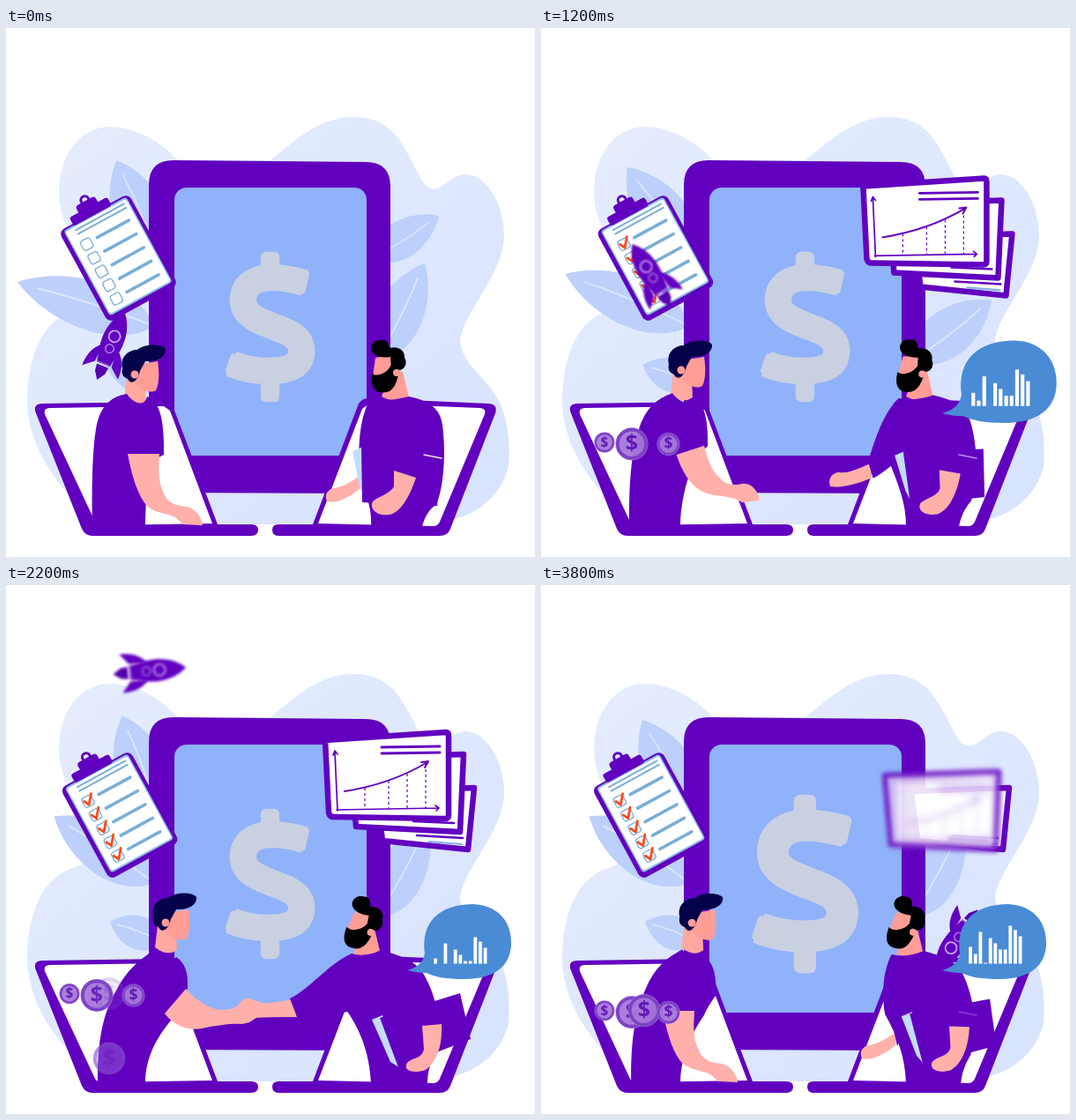
An HTML page with a canvas for the animation above (4 s loop, 600 px wide and 600 px high).

```html
<!DOCTYPE html>
<html lang="en">
<head>
<meta charset="utf-8">
<title>Business deal</title>
<style>
html, body { margin: 0; width: 100%; height: 100%; overflow: hidden; background: #fff; }
canvas { display: block; width: 600px; height: 600px; }
</style>
</head>
<body>
<canvas id="stage" width="600" height="600"></canvas>
<script>
const ctx = document.getElementById('stage').getContext('2d');
const LOOP = 4000, STEP = 200;
const PURPLE = '#6200c0', SKIN = '#ffb0aa', FACE = '#ff9d97', LEAF = '#bcd0fb', BLUE = '#7aaed6';

const clamp = (v, a = 0, b = 1) => Math.max(a, Math.min(b, v));
const ramp = (t, from, to) => clamp((t - from) / (to - from));
const smooth = k => k * k * (3 - 2 * k);
const wave = (t, period, peak = 0) => Math.cos((t - peak) / period * 2 * Math.PI);
const popOut = k => 1 + 2.7 * (k - 1) ** 3 + 1.7 * (k - 1) ** 2;

// Blend two paths that share the same commands
function blend(a, b, k) {
  const n = b.match(/-?[\d.]+/g);
  let i = 0;
  return a.replace(/-?[\d.]+/g, v => (+v + (n[i++] - v) * k).toFixed(2));
}

// Point on a Catmull-Rom curve through evenly timed points
function along(points, u) {
  const i = Math.floor(u), f = u - i;
  const at = j => points[clamp(j, 0, points.length - 1)];
  const [a, b, c, d] = [at(i - 1), at(i), at(i + 1), at(i + 2)];
  return [0, 1].map(n => b[n] + .5 * f * (c[n] - a[n]
    + f * (2 * a[n] - 5 * b[n] + 4 * c[n] - d[n] + f * (3 * (b[n] - c[n]) + d[n] - a[n]))));
}

function fill(d, color) {
  ctx.fillStyle = color;
  ctx.fill(new Path2D(d));
}

function line(d, color, width, cap = 'round') {
  ctx.strokeStyle = color;
  ctx.lineWidth = width;
  ctx.lineCap = cap;
  ctx.lineJoin = 'round';
  ctx.stroke(new Path2D(d));
}

function box(x, y, w, h, r, color) {
  ctx.beginPath();
  ctx.roundRect(x, y, w, h, r);
  ctx.fillStyle = color;
  ctx.fill();
}

function disc(x, y, r, color) {
  ctx.beginPath();
  ctx.arc(x, y, r, 0, 7);
  ctx.fillStyle = color;
  ctx.fill();
}

function ring(x, y, r, color, width) {
  ctx.beginPath();
  ctx.arc(x, y, r, 0, 7);
  ctx.strokeStyle = color;
  ctx.lineWidth = width;
  ctx.stroke();
}

// Draw with a transform around the pivot (px, py)
function layer(draw, { x = 0, y = 0, px = 0, py = 0, turn = 0, scale = 1, alpha = 1, blur = 0 } = {}) {
  ctx.save();
  ctx.translate(x + px, y + py);
  ctx.rotate(turn * Math.PI / 180);
  ctx.scale(scale, scale);
  ctx.translate(-px, -py);
  ctx.globalAlpha *= alpha;
  if (blur) ctx.filter = `blur(${blur}px)`;
  draw();
  ctx.restore();
}

function blob() {
  const g = ctx.createLinearGradient(100, 100, 480, 560);
  g.addColorStop(0, '#e4ecfd');
  g.addColorStop(1, '#d8e3fe');
  fill(`M117 112 C146 112 175 128 195 150 L300 150 C330 126 355 101 395 101
    C440 101 452 136 468 166 C475 180 482 186 494 180 C506 171 511 166 523 166
    C548 168 566 205 565 238 C562 282 517 325 515 355 C518 384 548 398 560 425
    C570 447 572 475 570 497 C562 530 536 551 505 558 L480 563 L110 563
    C70 535 26 485 24 425 C24 375 40 332 76 321 C100 314 104 296 96 277
    C86 254 60 225 60 185 C61 145 82 113 117 112 Z`, g);
}

function leaf(bx, by, tx, ty, w) {
  const dx = tx - bx, dy = ty - by, len = Math.hypot(dx, dy);
  const nx = -dy / len * w, ny = dx / len * w;
  const at = (k, s) => `${bx + dx * k + nx * s} ${by + dy * k + ny * s}`;
  fill(`M${at(0, 0)} C${at(.2, .9)} ${at(.7, .8)} ${at(1, 0)} C${at(.7, -.8)} ${at(.2, -.9)} ${at(0, 0)} Z`, LEAF);
  line(`M${at(0, 0)} Q${at(.5, .1)} ${at(.85, 0)}`, 'rgba(230,238,255,.75)', 1.8);
}

function leaves(t) {
  const top = wave(t, 2000, 300), side = wave(t, 1500), right = wave(t, 2000);
  leaf(172, 262, 115 + 18 * top, 153 - 5 * top, 46);
  leaf(168, 338, 34 - 21 * side, 275 + 13 * side, 44);
  leaf(178, 405, 116 - 2 * side, 382, 30);
  leaf(415, 262, 499 - 8 * right, 222 - 9 * right, 33);
  leaf(420, 378, 495 - 20 * right, 290 - 23 * right, 42);
}

function phone() {
  fill(`M190 150 L408 152 Q436 152 436 180 L436 500 Q436 528 408 528 L190 527
    Q162 527 162 499 L162 178 Q162 150 190 150 Z`, PURPLE);
  box(191, 181, 218, 304, [14, 14, 0, 0], '#90b2fa');
}

function dollar(t) {
  const beat = smooth(ramp(t % 1000, 400, 750));
  layer(() => {
    const c = '#c9d0e1';
    box(-11, -84, 21, 34, 6, c);
    box(-11, 52, 21, 33, 6, c);
    line(`M38 -49 C24 -53 12 -55 0 -55 C-22 -54 -31 -43 -31 -29 C-30 -12 -14 -7 3 0
      C20 6 35 12 35 28 C34 46 18 50 -2 50 C-18 50 -30 48 -44 42`, c, 30, 'butt');
    line('M39 -59 L35 -41 M-46 50 L-41 35', c, 9);
  }, { x: 300, y: 338.5, scale: 1.01 + .19 * beat });
}

function laptops() {
  fill('M40 426 L180 424 Q187 424 190 431 L240 563 L278 563 Q286 563 286 569 Q286 576 278 576 L98 576 Q90 576 86 568 L34 437 Q30 427 40 426 Z', PURPLE);
  fill('M49 431 L179 429 L186 434 L234 562 L110 564 Q103 564 101 560 L44 438 Q42 432 49 431 Z', '#fff');
  fill('M410 420 L548 426 Q558 427 555 437 L504 568 Q501 576 492 576 L309 576 Q302 576 302 569 Q302 563 309 563 L348 563 L400 426 Q404 420 410 420 Z', PURPLE);
  fill('M412 426 L538 431 Q545 432 543 438 L492 560 Q490 565 484 565 L354 562 L404 432 Z', '#fff');
}

function clipboard(t) {
  const ticks = Math.min(5, Math.ceil(t / 160));
  layer(() => {
    box(-45, -59, 90, 118, 7, PURPLE);
    box(-40, -57, 81, 110, 4, '#8fc0e4');
    box(-38.5, -55, 78, 106, 3, '#fff');
    box(-27, -67, 49, 11, 3, PURPLE);
    box(-15, -75, 25, 11, 4, PURPLE);
    ring(-2, -76, 4.5, PURPLE, 3);
    line('M-27 -51 H35 M-27 -46 H35', BLUE, 2);
    for (let i = 0; i < 5; i++) {
      const y = -32 + i * 17.6;
      line(`M-10 ${y} H31`, BLUE, 3.6);
      ctx.beginPath();
      ctx.roundRect(-30, y - 5, 12, 12, 3);
      ctx.strokeStyle = BLUE;
      ctx.lineWidth = 1.3;
      ctx.stroke();
      if (i < ticks) line(`M-28 ${y - 1} L-25 ${y + 5} L-17 ${y - 5}`, '#ff4a1c', 2.8);
    }
  }, { x: 127.5 - 2.5 * wave(t, 5600, 4200), y: 261, turn: -28.6 });
}

function card(d) {
  fill(d, '#fff');
  line(d, PURPLE, 6.5);
}

function charts(t) {
  const out = ramp(t, 3600, 4000);
  const drift = wave(t, 1600, 1400) * 2 - 2;
  const pose = i => {
    const k = ramp(t, 600 + i * 100, 830 + i * 100);
    return { x: drift, y: drift + 10 * (1 - k), alpha: k, blur: 6 * (1 - k) };
  };
  layer(() => {
    card('M424 238 L535 234 L528 304 L431 294 Z');
    line('M470 288 L522 291', PURPLE, 2.5);
    line('M484 295 L521 298', '#80aef0', 2.2);
  }, pose(2));
  const mid = pose(1), front = pose(0);
  layer(() => {
    card('M394 200 L523 196 L519 284 L401 278 Z');
    line('M466 272 L512 274', PURPLE, 2.5);
  }, { ...mid, y: mid.y + 40 * out, alpha: mid.alpha * (1 - .4 * out), blur: mid.blur + 4 * out });
  layer(() => {
    card('M366 180 L503 171 Q506 171 506 175 L506 265 Q506 269 502 269 L375 267 Q371 267 370 262 Z');
    line('M430 188 L496 187 M430 195 L496 194', PURPLE, 2.8);
    line('M380 260 L377 193 M375 197 L377 192 L380 196 M379 259 L494 257 M491 254 L495 257 L492 260', PURPLE, 1.7);
    line('M388 238 Q440 230 482 205 M475 205 L483 204 L479 211', PURPLE, 2);
    ctx.setLineDash([3, 3]);
    line('M411 234 V258 M438 226 V258 M459 218 V258 M480 207 V257', PURPLE, 1.2, 'butt');
  }, {
    px: 434, py: 219, x: front.x + 50 * out, y: front.y + 78 * out, scale: 1 - .28 * out,
    alpha: front.alpha * (1 - 1.1 * out), blur: front.blur + 8 * out
  });
}

const FLIGHT = [[119, 360], [121, 355], [128, 336], [125, 280], [58, 205], [108, 115],
  [240, 104], [462, 208], [488, 330], [478, 388], [466, 410]];

function rocket(t) {
  const u = t / LOOP * (FLIGHT.length - 1);
  const [x, y] = along(FLIGHT, u), [x2, y2] = along(FLIGHT, u + .05);
  const dx = x2 - x, dy = y2 - y;
  layer(() => {
    fill('M-9 2 C-20 10 -22 22 -22 33 L-10 23 Z M9 2 C20 10 22 22 22 33 L10 23 Z', PURPLE);
    fill('M0 -41 C10 -30 14 -15 12 2 L8 23 H-8 L-12 2 C-14 -15 -10 -30 0 -41 Z', PURPLE);
    fill('M-7 25 H7 L6 33 L0 42 L-6 33 Z', '#5600ae');
    ring(0, -11, 6.5, '#c6a5ee', 1.8);
    ring(0, 4, 4.8, '#a679de', 1.6);
    line('M-8 22 H8', '#a679de', 1);
  }, { x, y, turn: Math.atan2(dx, -dy) * 180 / Math.PI, blur: clamp(Math.hypot(dx, dy) / 3, 0, 1.8) });
}

function leftMan(p, q, open, lift) {
  const head = { x: 35 * p, y: -10 * clamp(p * 1.35) };
  layer(() => fill('M137 396 L158 404 L159 424 Q148 432 134 421 Z', '#ffa8a0'), head);
  fill(blend(
    `M98 565 C97 520 98 480 102 455 C106 430 118 418 137 415 C147 429 158 428 160 418
     C172 422 180 438 179 484 C174 487 168 489 163 492 C160 515 158 545 158 565 Z`,
    `M104 565 C103 520 110 485 125 460 C138 435 152 425 169 413 C181 425 190 425 193 422
     C203 428 207 440 206 458 C200 468 196 477 193 487 C172 510 158 535 158 565 Z`, p), PURPLE);
  fill(blend(
    `M138 483 C142 505 148 525 156 537 C165 551 180 549 192 555 L201 563 L223 564
     C222 555 215 545 205 543 C195 542 185 540 180 530 C172 515 173 500 174 483 Z`,
    `M180 486 C190 499 205 506 222 503 C240 499 258 497 268 498 L276 496 L290 487
     C288 472 275 463 266 473 C262 480 255 481 247 482 C230 482 215 470 204 458 Z`, q), SKIN);
  if (open) layer(() => line('M252 477 L276 468 L290 466 M264 478 L284 470 L299 464 M272 482 L294 472', SKIN, 5), { y: lift });
  layer(() => {
    fill('M147 382 L172 378 C174 390 174 403 170 411 C163 415 154 411 146 402 Z', FACE);
    fill(`M132 386 C129 373 139 365 149 365 C158 358 176 358 181 364 C182 373 171 379 158 378
      L152 389 C149 402 141 405 138 398 C132 396 131 391 132 386 Z`, '#04034a');
    disc(146, 393, 4.5, FACE);
  }, head);
}

function rightMan(p, q) {
  const head = { x: -30 * p, px: 432, py: 395, turn: 15 * clamp(p * 1.3) };
  layer(() => fill('M437 386 L450 390 L457 419 Q440 426 426 418 Z', FACE), { x: -32 * p });
  fill(blend(
    'M402 508 C390 515 380 522 370 522 C364 525 361 530 364 537 C375 540 390 532 402 522 Z',
    'M326 470 C312 472 300 475 290 474 C275 465 262 480 268 492 C290 490 310 490 330 490 Z', q), SKIN);
  fill(blend(
    `M414 565 C416 545 405 520 401 500 C399 470 402 440 413 421 C425 424 440 422 457 418
     C475 422 492 428 495 450 C499 480 497 520 488 541 C480 545 475 555 472 565 Z`,
    `M414 565 C412 530 402 505 386 482 C380 455 385 430 392 418 C400 421 415 420 425 414
     C445 420 465 425 474 442 C490 470 494 500 487 530 C480 545 478 555 478 565 Z`, p), PURPLE);
  fill(blend(
    'M412 423 C404 440 402 460 400 505 L404 523 C410 512 412 500 420 485 Z',
    'M392 418 C365 430 345 458 322 469 L330 490 C355 490 375 486 400 482 Z', q), PURPLE);
  fill(blend('M393 480 L405 475 L408 538 L400 515 Z', 'M415 493 L427 488 L446 547 L436 541 Z', p), '#c3dcfb');
  fill(blend('M403 474 L494 486 L489 542 L404 538 Z', 'M424 491 L515 463 L527 515 L445 547 Z', p), PURPLE);
  line('M474 484 L494 488', `rgba(240,228,255,${1 - p})`, 1.5);
  fill(blend(
    'M440 502 L465 510 C460 525 450 549 435 552 C420 554 412 545 416 537 C425 530 436 528 440 520 Z',
    'M472 500 L494 498 C495 520 490 540 476 550 C460 555 450 550 455 542 C462 535 472 538 474 526 Z', p), SKIN);
  layer(() => {
    fill('M419 374 L438 371 L442 390 L430 401 L416 396 Z', FACE);
    fill('M415 392 C421 396 432 392 437 382 L446 387 C444 402 440 411 432 413 C421 415 413 411 415 392 Z', '#000');
    fill('M424 354 C434 352 434 361 435 363 C445 360 453 366 452 374 C456 380 452 387 447 388 L437 386 L436 373 C424 375 414 371 414 363 C415 357 419 354 424 354 Z', '#000');
    disc(443, 391, 4, FACE);
  }, head);
}

function coin(x, y, r, alpha) {
  layer(() => {
    disc(0, 0, r, '#a679da');
    ring(0, 0, r * .87, '#7c3fc6', r * .2);
    ctx.fillStyle = '#5f14b4';
    ctx.font = `bold ${r * 1.35}px "Open Sans", Arial, sans-serif`;
    ctx.textAlign = 'center';
    ctx.textBaseline = 'middle';
    ctx.fillText('$', 0, r * .06);
  }, { x, y, alpha, blur: .4 });
}

// Coins rise one after another, each fading in and out
function coins(t) {
  const stream = (x, r, start, from, life) => {
    for (let s = start; s <= t; s += 920) {
      const u = t - s;
      if (u < life) coin(x, from - .08 * u, r, .95 * ramp(u, -60, 200) * ramp(u, life, life - 200));
    }
  };
  stream(103, 18.5, 760, 507, 1100);
  stream(117, 18.5, 1230, 541, 1000);
  stream(72, 11.5, 750, 506, 900);
  stream(144.5, 13, 750, 508, 900);
}

const BARS = [28, 20, 45, 10, 38, 32, 25, 25, 52, 47, 40, 8];

function bubble(t) {
  if (t < 1000) return;
  const drop = 11 + 11 * wave(t, 1250, 2200);
  layer(() => {
    fill(`M455 437 C466 434 473 429 475 418 C470 382 492 362 530 362 C558 363 574 382 573 408
      C572 432 554 447 520 447 C500 447 488 445 477 440 C469 440 462 439 455 437 Z`, '#4a8bd6');
    BARS.forEach((h, i) => {
      const tall = Math.max(0, h - drop);
      box(485.2 + i * 5.65, 429.5 - tall, 3.8, tall, 0, '#fff');
    });
  }, { px: 455, py: 437, scale: popOut(ramp(t, 900, 1400)) });
}

function draw(t) {
  ctx.fillStyle = '#fff';
  ctx.fillRect(0, 0, 600, 600);
  const meet = ramp(t, 1000, 1540);
  const lean = meet - .28 * ramp(t, 2900, 3800);
  const reach = meet - smooth(ramp(t, 3200, 3800));
  blob();
  leaves(t);
  phone();
  dollar(t);
  laptops();
  clipboard(t);
  charts(t);
  rocket(t);
  rightMan(lean, reach);
  leftMan(lean, reach, t >= 2600 && t < 3400, -11 * ramp(t, 2800, 3200));
  coins(t);
  bubble(t);
}

const begin = performance.now();
function tick() {
  const t = (performance.now() - begin) % LOOP;
  draw(Math.floor(t / STEP) * STEP);
  requestAnimationFrame(tick);
}
tick();
</script>
</body>
</html>
```
